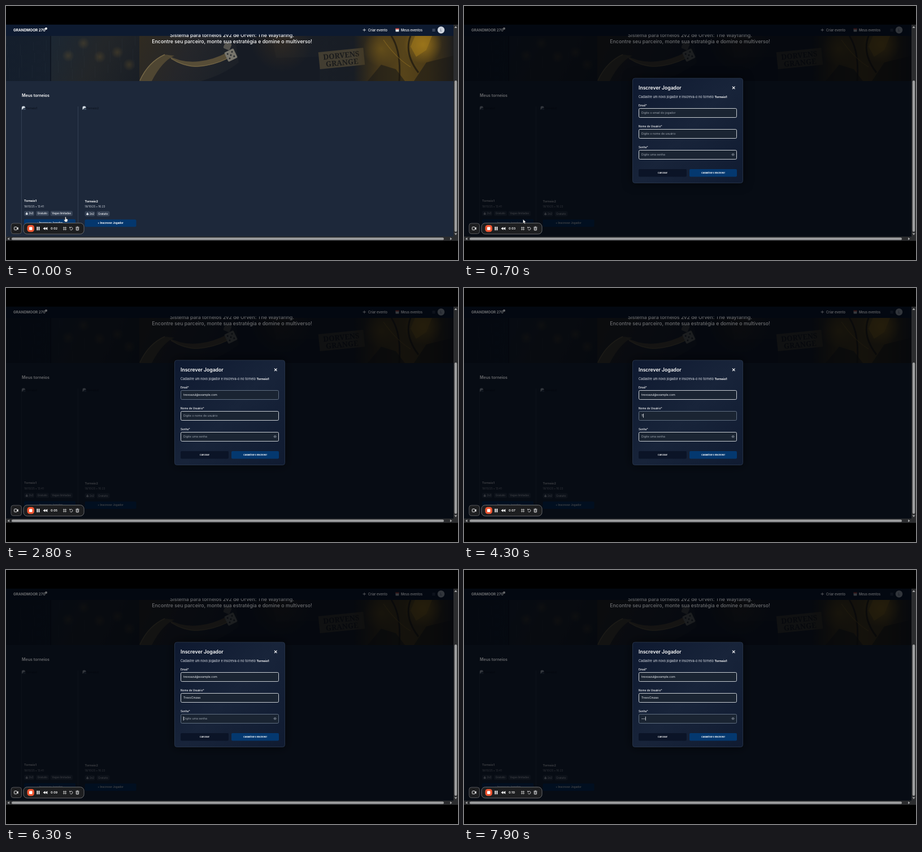
An HTML page with a canvas that plays this animation: 800 by 450 pixels, repeating every 8000 ms.

```html
<!DOCTYPE html>
<html lang="pt-BR">
<head>
<meta charset="utf-8">
<title>Inscrever Jogador</title>
<style>
html, body { margin: 0; width: 100%; height: 100%; overflow: hidden; background: #000; }
canvas { display: block; width: 800px; height: 450px; }
</style>
</head>
<body>
<canvas id="stage" width="800" height="450"></canvas>
<script>
const ctx = document.getElementById('stage').getContext('2d');
const LOOP = 8000, STEP = 100, MODAL_AT = 700, BLINK = 500;

const fields = [
  { label: 'Email*', hint: 'Digite o email do jogador', y: 181.5, text: 'trevoazul@example.com',
    focus: 1500, blur: 3100, keyTime: i => 1800 + 25 * i },
  { label: 'Nome de Usuário*', hint: 'Digite o nome de usuário', y: 218.5, text: 'TrevoCinzas',
    focus: 3100, blur: 6200, keyTime: i => i < 5 ? 4300 + 100 * i : 4900 + 40 * (i - 5) },
  { label: 'Senha*', hint: 'Digite uma senha', y: 255.5, text: '•••', secret: true,
    focus: 6200, blur: LOOP, keyTime: i => 7500 + 200 * i }
];

function text(str, x, y, size, color, weight = 400, align = 'left', family = 'Inter, sans-serif') {
  ctx.font = `${weight} ${size}px ${family}`;
  ctx.textAlign = align;
  ctx.fillStyle = color;
  ctx.fillText(str, x, y);
  return ctx.measureText(str).width;
}

function rect(x, y, w, h, color) {
  ctx.fillStyle = color;
  ctx.fillRect(x, y, w, h);
}

function box(x, y, w, h, r, fill, stroke, lineWidth = 1) {
  ctx.beginPath();
  ctx.roundRect(x, y, w, h, r);
  if (fill) { ctx.fillStyle = fill; ctx.fill(); }
  if (stroke) { ctx.strokeStyle = stroke; ctx.lineWidth = lineWidth; ctx.stroke(); }
}

function disc(x, y, r, color) {
  ctx.beginPath();
  ctx.arc(x, y, r, 0, 7);
  ctx.fillStyle = color;
  ctx.fill();
}

function glow(x, y, r, rgb, alpha) {
  const g = ctx.createRadialGradient(x, y, 0, x, y, r);
  g.addColorStop(0, `rgba(${rgb},${alpha})`);
  g.addColorStop(1, `rgba(${rgb},0)`);
  disc(x, y, r, g);
}

function shape(d, fill) {
  ctx.fillStyle = fill;
  ctx.fill(new Path2D(d));
}

function line(d, stroke, width = 1) {
  ctx.strokeStyle = stroke;
  ctx.lineWidth = width;
  ctx.stroke(new Path2D(d));
}

function fade(x0, y0, x1, y1, ...colors) {
  const g = ctx.createLinearGradient(x0, y0, x1, y1);
  colors.forEach((c, i) => g.addColorStop(i / (colors.length - 1), c));
  return g;
}

function at(x, y, angle, draw) {
  ctx.save();
  ctx.translate(x, y);
  ctx.rotate(angle);
  draw();
  ctx.restore();
}

const clamp = v => Math.max(0, Math.min(1, v));
const mix = (a, b, k) => `rgb(${a.map((v, i) => Math.round(v + (b[i] - v) * k))})`;

function die(x, y, size, angle, color, pips) {
  at(x, y, angle, () => {
    box(-size / 2, -size / 2, size, size, 2, color);
    const d = size * 0.24;
    for (const [px, py] of pips) disc(px * d, py * d, size * 0.08, '#25282c');
  });
}

function hero() {
  ctx.save();
  ctx.beginPath();
  ctx.rect(0, 53, 792, 80);
  ctx.clip();
  rect(0, 53, 792, 80, fade(0, 0, 792, 0, '#141e2c', '#19222d', '#1d2128', '#181d25', '#1b1c1f'));
  rect(80, 53, 156, 80, fade(80, 53, 236, 133, '#1c2733', '#232629', '#191e25'));
  for (let i = 0; i < 34; i++) {
    const x = (i * 67) % 245, y = 53 + (i * 29) % 60;
    rect(x, y, 0.6, 14 + i % 9, 'rgba(110,135,165,.08)');
  }
  rect(78, 53, 2, 80, '#0f1621');
  for (const [x, y] of [[110, 88], [137, 66], [166, 90], [197, 82], [218, 104]]) {
    glow(x, y, 11, '140,108,45', 0.25);
  }
  rect(236, 53, 160, 80, fade(236, 53, 396, 133, '#302b21', '#25262a', '#1a2028'));
  // Ribbon and dice
  shape('M236 133Q250 100 280 86L298 88Q276 98 258 133Z', '#4f4632');
  shape('M284 86Q312 102 342 98Q368 95 392 82L396 91Q362 108 334 108Q306 106 284 86Z', '#574d37');
  line('M237 132Q252 99 281 86', '#756746', 1.4);
  line('M292 93Q314 107 338 107Q366 106 394 92', '#756746', 1.2);
  shape('M405 53H470L478 92L555 90V133H345Q385 122 412 100Z', '#161b24');
  glow(488, 62, 55, '74,54,28', 0.4);
  die(392, 71, 12, 0.4, '#55544f', []);
  die(398, 87, 18, -0.45, '#77756c', [[-1, -1], [1, -1], [0, 0], [-1, 1], [1, 1]]);
  // Sign
  at(594, 93, -0.1, () => {
    rect(-40, -15, 80, 30, '#423d31');
    text('DORVENS', 0, -1, 13, '#1a1b1c', 700, 'center', '"Noto Serif", serif');
    text('GRANGE', 0, 12, 13, '#1a1b1c', 700, 'center', '"Noto Serif", serif');
  });
  // Golden figure
  rect(615, 53, 177, 80, fade(615, 0, 792, 0, 'rgba(64,49,18,0)', '#44361a', '#57441a', '#4b3a17', '#1d1d1e'));
  glow(664, 76, 32, '122,94,26', 0.55);
  glow(738, 68, 34, '170,128,28', 0.75);
  shape('M724 53H754L744 78L726 90L716 72Z', 'rgba(160,120,26,.55)');
  shape('M640 133L664 104L690 112L706 133Z', 'rgba(26,25,24,.6)');
  shape('M722 133L744 100L792 88V133Z', 'rgba(28,25,22,.6)');
  line('M682 53Q700 80 696 133M716 53Q704 84 730 118', 'rgba(28,24,16,.75)', 3);
  line('M668 60Q690 92 716 108', 'rgba(160,122,36,.5)', 1.2);
  ctx.restore();
}

function headings(alpha) {
  ctx.save();
  ctx.globalAlpha = alpha;
  text('Encontre seu parceiro, monte sua estratégia e domine o multiverso!', 400, 66, 8.8, '#fff', 500, 'center');
  ctx.save();
  ctx.beginPath();
  ctx.rect(0, 50.5, 792, 10);
  ctx.clip();
  text('Sistema para torneios 2v2 de Orven: The Wayfaring.', 400, 55, 8.8, '#fff', 500, 'center');
  ctx.restore();
  text('GRANDMOOR 270', 13, 45, 6.4, '#fff', 700);
  disc(71, 40, 2, '#fff');
  line('M631.5 42.5H637M634.2 39.8V45.2', '#fff', 0.7);
  text('Criar evento', 641, 44.5, 5.8, '#fff', 500);
  text('Meus eventos', 699, 44.5, 5.7, '#fff', 500);
  text('Meus torneios', 28, 160.5, 7.1, '#fff', 600);
  ctx.restore();
}

function chip(label, x, y, w, icon) {
  box(x, y, w, 9, 2.5, '#364255');
  if (icon) {
    shape(`M${x + 2.5} ${y + 5}q2 -2 4.5 0q-.3 2 -2.3 2t-2.2 -2z`, '#e0e5ec');
    disc(x + 4.7, y + 3.4, 1, '#e0e5ec');
  }
  text(label, x + (icon ? 8.5 : 2.8), y + 6.1, 4.5, '#eef1f5', 500);
}

function card(x, y, name, date, limited, buttonColor, labelColor) {
  shape(`M${x - 4} 184v-4.5q0 -2 2 -2h2.5l2 2.5l-3.5 1z`, '#d5dde5');
  shape(`M${x - 3} 184l3 -3l2.5 1v2z`, '#405064');
  text(name, x + 2.5, 183, 5.3, '#0b111b');
  text(name, x, y, 5.35, '#fff', 700);
  text(date, x, y + 9.5, 4.7, '#d4d9e1');
  chip('2v2', x, y + 16, 18, true);
  chip('Gratuito', x + 21, y + 16, 23);
  if (limited) chip('Vagas limitadas', x + 46.5, y + 16, 39.5);
  box(x, y + 30.7, 91, 13, 2, buttonColor);
  text('+ Inscrever Jogador', x + 45.5, y + 38.8, 4.65, labelColor, 700, 'center');
}

function page(t) {
  rect(0, 33, 792, 376, '#1d283a');
  hero();
  rect(0, 33, 792, 20, '#0d1a30');
  headings(1);
  box(689.5, 40, 6, 5.5, 0.7, '#e8e8ea');
  rect(689.5, 39.5, 6, 2, '#d5473f');
  line('M754.5 41H759.5M754.5 42.7H759.5M754.5 44.4H759.5', '#77839a', 0.7);
  disc(770, 42.5, 6.2, '#ced4de');
  text('L', 770, 44.6, 5.5, '#44506a', 500, 'center');
  line('M27.5 180V390M127.5 178V390', '#39465a', 0.8);
  const hover = t < MODAL_AT ? clamp(t / 500) : 0;
  card(32, 347, 'Torneio1', '18/10/25 • 13:41', true,
    mix([4, 55, 110], [146, 130, 200], hover), mix([255, 255, 255], [248, 222, 208], hover));
  card(139.5, 347.5, 'Torneio2', '18/10/25 • 16:23', false, '#04376e', '#fff');
}

function scrollbars() {
  rect(792, 33, 8, 383, '#2b2c2e');
  rect(0, 408.5, 800, 7.5, '#2b2c2e');
  box(793.8, 132, 4.4, 268, 2.2, '#9d9e9f');
  box(10, 410.2, 765, 4.4, 2.2, '#9d9e9f');
  shape('M793.5 39L796 35.5L798.5 39ZM793.5 402.5L796 406L798.5 402.5Z', '#a2a3a4');
  shape('M6 410L2.5 412.4L6 414.8ZM786 410L789.5 412.4L786 414.8Z', '#a2a3a4');
}

function recorder(t) {
  const seconds = 2 + Math.floor((t + 700) / 1000);
  box(9, 385, 18.5, 18.5, 4, '#1d1e20', '#5a5b5e', 0.9);
  box(14.5, 391.5, 5, 5.2, 1, null, '#fff', 0.9);
  shape('M19.5 393.2L21.7 391.8V396.4L19.5 395Z', '#fff');
  box(31, 384.6, 107, 19.4, 6.5, '#1d1e20', '#66676a', 1);
  box(37.5, 388, 12.5, 12.3, 4.5, '#ee5430');
  box(41, 391.4, 5.5, 5.5, 1, '#fff');
  rect(54.5, 391, 1.8, 6.4, '#fff');
  rect(57.6, 391, 1.8, 6.4, '#fff');
  shape('M69.5 391.4V397L65.5 394.2ZM73.3 391.4V397L69.3 394.2Z', '#fff');
  text('0:' + String(seconds).padStart(2, '0'), 79, 396.2, 5.4, '#fff', 600);
  line('M102.5 391V397.5M105.5 391V397.5M100.8 392.7H107.2M100.8 395.7H107.2', '#c9c9cb', 0.8);
  ctx.beginPath();
  ctx.arc(115.4, 394.4, 2.5, -2.2, 2.7);
  ctx.strokeStyle = '#d5d5d7';
  ctx.lineWidth = 0.9;
  ctx.stroke();
  shape('M112.3 390.8V393.5H115Z', '#d5d5d7');
  box(124.2, 392.5, 4.4, 4.9, 0.8, null, '#e5e5e6', 0.9);
  line('M123.2 392H129.6M125.2 391H127.6M125.7 393.8V396.3M127.2 393.8V396.3', '#e5e5e6', 0.8);
}

function field(f, t) {
  const focused = t >= f.focus && t < f.blur;
  let count = 0;
  while (count < f.text.length && t >= f.keyTime(count)) count++;
  text(f.label, 309, f.y - 3.6, 4.75, '#fff', 500);
  box(309.5, f.y, 173, 16, 2, '#1a2432', focused ? '#68778a' : '#dce0e5', 0.9);
  const typed = f.text.slice(0, count), base = f.y + 9.5;
  const width = count
    ? text(typed, 314, base, f.secret ? 4.2 : 5.15, '#eef1f5')
    : (text(f.hint, 314, base, 5.15, '#9ba3ae'), 0);
  const since = count ? f.keyTime(count - 1) : f.focus;
  if (focused && Math.floor((t - since) / BLINK) % 2 === 0) rect(313.8 + width, f.y + 4.2, 0.8, 7, '#fff');
  if (f.secret) {
    line('M473.5 263.3Q476 259.8 478.8 263.3Q476 266.6 473.5 263.3Z', '#8d96a2', 0.8);
    disc(476.1, 263.2, 0.9, '#8d96a2');
  }
}

function modal(t) {
  rect(0, 33, 792, 376, 'rgba(0,3,9,.76)');
  headings(0.22);
  ctx.save();
  ctx.shadowColor = 'rgba(0,0,0,.6)';
  ctx.shadowBlur = 18;
  box(298.5, 128, 195, 185.5, 4, '#111c31');
  ctx.restore();
  box(298.5, 128, 195, 185.5, 4, fade(298, 128, 494, 314, '#0e1930', '#18243a', '#101b31'), '#29364b', 0.9);
  text('Inscrever Jogador', 309, 148, 8.6, '#fff', 600);
  line('M475 142.7L479.5 147.2M479.5 142.7L475 147.2', '#fff', 1.2);
  const w = text('Cadastre um novo jogador e inscreva-o no torneio ', 309, 163, 5.6, '#e0e4eb');
  text('Torneio1', 309 + w, 163, 5.4, '#fff', 700);
  fields.forEach(f => field(f, t));
  box(309, 289, 85, 13.5, 2, '#0b1427');
  text('Cancelar', 351.5, 297.2, 4, '#fff', 600, 'center');
  box(399, 289, 84, 13.5, 2, '#04386f');
  text('Cadastrar e Inscrever', 441, 297.2, 4, '#fff', 700, 'center');
}

function pointer(t) {
  if (t >= 1800) return;
  const k = clamp((t - 900) / 600), e = k * k * (3 - 2 * k);
  const x = 104.5 + 247.5 * e;
  const y = 374 + 4 * clamp(t / 500) - 188 * e;
  at(x, y, 0, () => {
    if (t < MODAL_AT) {
      const hand = 'M0 0Q1 -1 1.8 0V3L4 3.5Q5 4 4.6 6L3.8 8.5H0L-2 5.2Q-1.6 4 0 5Z';
      shape(hand, '#fff');
      line(hand, '#222', 0.5);
    } else if (t < 1500) {
      const arrow = 'M0 0V7L1.6 5.5L2.8 8L4 7.5L2.8 5H5Z';
      shape(arrow, '#fff');
      line(arrow, '#222', 0.4);
    } else {
      line('M-1.5 -4H1.5M0 -4V4M-1.5 4H1.5', '#e5e5e5', 0.7);
    }
  });
}

function frame() {
  const t = Math.floor(performance.now() % LOOP / STEP) * STEP;
  rect(0, 0, 800, 450, '#000');
  page(t);
  if (t >= MODAL_AT) modal(t);
  scrollbars();
  recorder(t);
  pointer(t);
  requestAnimationFrame(frame);
}
frame();
</script>
</body>
</html>
```
